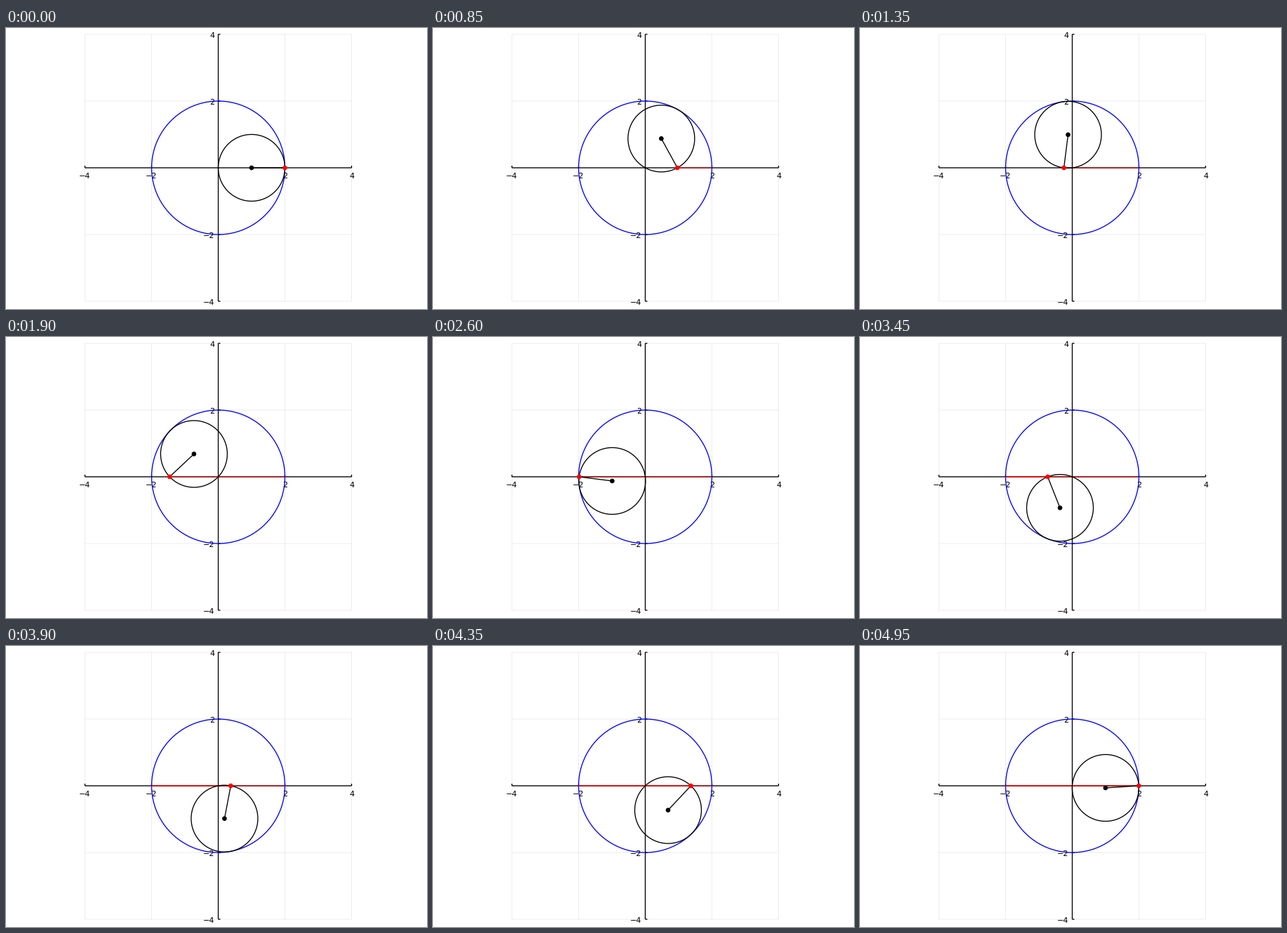
Recreate the animation shown at these times as a matplotlib script. Size 600x400 px, loop 5 s.

```python
import numpy as np
import matplotlib.pyplot as plt
from matplotlib.animation import FuncAnimation
from matplotlib.patches import Circle

plt.rcParams.update({
    "path.snap": False,
    "text.hinting": "none",
    "font.family": "DejaVu Sans",
    "lines.solid_capstyle": "butt",
})

W, H, DPI = 600, 400, 100
OX, OY, UNIT = 302.5, 199.0, 47.5   # origin and unit length in pixels
FRAMES, INTERVAL = 100, 50
PX = 72 / DPI                       # points per pixel
LINE = 1.33
DOT = 3.33
TICK = 3
REACH = 4

fig = plt.figure(figsize=(W / DPI, H / DPI), dpi=DPI, facecolor="white")
ax = fig.add_axes([0, 0, 1, 1])
ax.set_xlim(0, W)
ax.set_ylim(H, 0)
ax.axis("off")


def to_px(x, y):
    return OX + UNIT * np.asarray(x), OY - UNIT * np.asarray(y)


def line(x, y, color="black", width=LINE, z=2, **kw):
    px, py = to_px(x, y)
    return ax.plot(px, py, color=color, lw=width * PX, zorder=z, **kw)[0]


def dot(color):
    return ax.add_patch(Circle((0, 0), DOT, fc=color, lw=0, zorder=8))


def label(x, y, value, ha):
    text = str(value).replace("-", "\u2212")
    ax.text(x, y, text, fontsize=8, ha=ha, va="baseline", zorder=3)


def draw_axes():
    span = [-REACH, REACH]
    tick = TICK / UNIT
    for v in (-4, -2, 0, 2, 4):
        line([v, v], span, width=0.67, z=1, alpha=0.1)
        line(span, [v, v], width=0.67, z=1, alpha=0.1)
        if v:
            line([v, v], [0, tick])
            line([0, tick], [v, v])
            px, py = to_px(v, v)
            label(px, OY + 15, v, "center")
            label(OX - 5, py + 5, v, "right")
    line(span, [0, 0])
    line([0, 0], span)


turn = np.linspace(0, 2 * np.pi, 201)
ring_x, ring_y = np.cos(turn), np.sin(turn)

draw_axes()
line(2 * ring_x, 2 * ring_y, "blue", z=4)
trail_out = line([2, 2], [0, 0], "red", z=5, alpha=0.72)
trail_back = line([-2, -2], [0, 0], "red", z=5, alpha=0.72)
wheel = line(ring_x, ring_y, z=6)
spoke = line([0, 1], [0, 0], z=7)
hub = dot("black")
pen = dot("red")


def update(i):
    angle = 2 * np.pi * i / FRAMES
    cx, cy = np.cos(angle), np.sin(angle)
    x = 2 * cx                      # the rim point slides along the diameter
    returning = i > FRAMES // 2

    wheel.set_data(*to_px(cx + ring_x, cy + ring_y))
    spoke.set_data(*to_px([cx, x], [cy, 0]))
    hub.center = to_px(cx, cy)
    pen.center = to_px(x, 0)
    trail_out.set_data(*to_px([2, -2 if returning else x], [0, 0]))
    trail_back.set_data(*to_px([-2, x if returning else -2], [0, 0]))
    return trail_out, trail_back, wheel, spoke, hub, pen


anim = FuncAnimation(fig, update, frames=FRAMES, interval=INTERVAL,
                     repeat=True, repeat_delay=0, blit=False)
plt.show()
```
